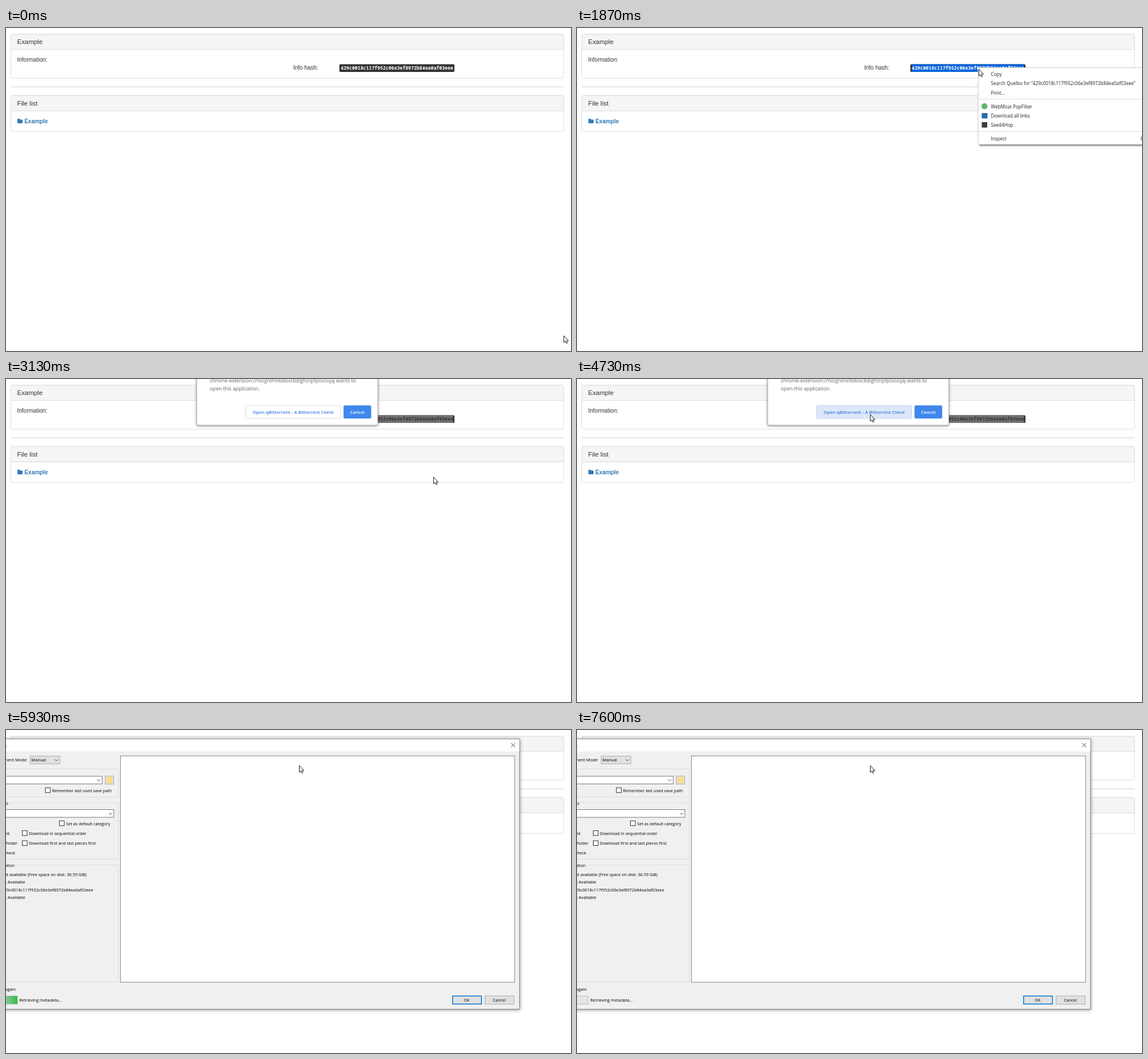
These frames come from a looping animation (989 px wide and 566 px high, 8 s). An HTML page:

```html
<!DOCTYPE html>
<html lang="en">
<head>
<meta charset="utf-8">
<title>Info hash to magnet</title>
<style>
html, body { margin: 0; width: 100%; height: 100%; overflow: hidden; background: #fff; }
svg { display: block; width: 989px; height: 566px; }
text { white-space: pre; }

.page { font: 10px "Liberation Sans", Arial, sans-serif; fill: #333; }
.page .head { font-size: 11.44px; }
.panel { fill: #fff; stroke: #ddd; }
.bar { fill: #f5f5f5; stroke: #ddd; }
.link { fill: #337ab7; font-weight: bold; }
.hash { font: 600 8.21px "Noto Sans Mono", "DejaVu Sans Mono", monospace; }

.menu { font: 8.1px "Open Sans", "Noto Sans", sans-serif; fill: #222; }
.menu .box { fill: #fff; stroke: #c8c8c8; filter: drop-shadow(3px 2px 1px rgba(0, 0, 0, .5)); }
.menu line { stroke: #ddd; }

.prompt { font: 8.72px "Open Sans", "Noto Sans", sans-serif; fill: #5f6368; }
.prompt .box { fill: #fff; stroke: #bbb; filter: drop-shadow(0 1px 2px rgba(0, 0, 0, .5)); }
.prompt .label { font-size: 7.95px; font-weight: 600; text-anchor: middle; }

.dialog { font: 7.3px "Open Sans", "Noto Sans", sans-serif; fill: #000; }
.dialog .box { fill: #f0f0f0; stroke: #777; filter: drop-shadow(0 1px 3px rgba(0, 0, 0, .4)); }
.dialog .group { fill: none; stroke: #dcdcdc; }
.dialog .field { fill: #fff; stroke: #7a7a7a; }
.dialog .button { fill: #e1e1e1; stroke: #adadad; }
.dialog .check { fill: #fff; stroke: #333; }
.dialog .stroke { fill: none; stroke: #444; }
.end { text-anchor: end; }
.mid { text-anchor: middle; }

/* Every part shares one 8 s clock; 0.8333 % is one tick. */
.anim { animation: 8s -4ms step-end infinite; }
.cursor { animation-name: move; }
.arrow { animation-name: arrow; }
.ibeam { animation-name: ibeam; mix-blend-mode: difference; }
.select { animation-name: select; }
.hash.anim { animation-name: hashText; }
.menu { animation-name: menu; }
.hover { animation-name: hover; }
.prompt { animation-name: prompt; }
.open { animation-name: press; }
.dialog { animation-name: dialog; }
.chunk { animation-name: marquee; }

@keyframes move {
  0% { transform: translate(976px, 539px); animation-timing-function: steps(3); }
  2.5% { transform: translate(930px, 470px); animation-timing-function: steps(5); }
  6.6667% { transform: translate(740px, 110px); animation-timing-function: steps(3); }
  9.1667% { transform: translate(702px, 70px); }
  21.6667% { transform: translate(702px, 70px); animation-timing-function: steps(2); }
  23.3333% { transform: translate(703px, 72px); animation-timing-function: steps(3); }
  25.8333% { transform: translate(717px, 97px); animation-timing-function: steps(3); }
  28.3333% { transform: translate(740px, 140px); animation-timing-function: steps(2); }
  30% { transform: translate(746px, 158px); animation-timing-function: steps(2); }
  31.6667% { transform: translate(748px, 171.5px); }
  44.1667% { transform: translate(748px, 171.5px); animation-timing-function: steps(3); }
  46.6667% { transform: translate(435px, 54px); animation-timing-function: steps(2); }
  48.3333%, 100% { transform: translate(513px, 62px); }
}
@keyframes arrow {
  0%, 19.1667%, 100% { opacity: 1; }
  9.1667% { opacity: 0; }
}
@keyframes ibeam {
  0%, 19.1667%, 100% { opacity: 0; }
  9.1667% { opacity: 1; }
}
@keyframes select {
  0% { fill: transparent; }
  13.3333%, 60.8333%, 100% { fill: #0a66dc; }
  39.1667% { fill: #717171; }
}
@keyframes hashText {
  0%, 60.8333%, 100% { fill: #fff; }
  39.1667% { fill: #363636; }
}
@keyframes menu {
  0%, 39.1667%, 100% { opacity: 0; }
  19.1667% { opacity: .6; }
  20% { opacity: 1; }
}
@keyframes hover {
  0% { opacity: 0; transform: translateY(73px); }
  24.1667% { opacity: 1; transform: translateY(73px); }
  25% { opacity: 1; transform: translateY(89px); }
  26.6667% { opacity: 1; transform: translateY(105px); }
  27.5% { opacity: 0; transform: translateY(105px); }
  28.3333% { opacity: 1; transform: translateY(128.5px); }
  29.1667% { opacity: 1; transform: translateY(145px); }
  30.8333%, 100% { opacity: 1; transform: translateY(162px); }
}
@keyframes prompt {
  0%, 60.8333%, 100% { opacity: 0; }
  39.1667% { opacity: 1; }
}
@keyframes press {
  0% { fill: #fff; stroke: #dadce0; }
  59.1667%, 100% { fill: #dce8f8; stroke: #bfd3ef; }
}
@keyframes dialog {
  0% { opacity: 0; }
  65% { opacity: .6; }
  65.8333%, 100% { opacity: 1; }
}
@keyframes marquee {
  0% { transform: translateX(-90px); }
  69.1667% { transform: translateX(-90px); animation-timing-function: steps(10); }
  77.5% { transform: translateX(20px); }
  87.5% { transform: translateX(-88px); animation-timing-function: steps(9); }
  95%, 100% { transform: translateX(20px); }
}
</style>
</head>
<body>
<svg viewBox="0 0 989 566">
  <defs>
    <linearGradient id="glow">
      <stop offset="0" stop-color="#06b025" stop-opacity="0"/>
      <stop offset=".5" stop-color="#06b025" stop-opacity=".82"/>
      <stop offset="1" stop-color="#06b025" stop-opacity="0"/>
    </linearGradient>
    <clipPath id="track"><rect y="466.5" width="19.2" height="13.5"/></clipPath>
    <path id="chevron" d="M-2.8 -1.4L0 1.4L2.8 -1.4"/>
    <rect id="tick" width="8.5" height="8.5"/>
  </defs>

  <g class="page">
    <rect class="panel" x="8.5" y="11" width="967.5" height="77" rx="3"/>
    <path class="bar" d="M8.5 37.7V14q0-3 3-3H973q3 0 3 3V37.7Z"/>
    <text class="head" x="19.5" y="28.3">Example</text>
    <text x="19.5" y="59.3">Information:</text>
    <text x="502.7" y="73.4">Info hash:</text>
    <rect x="583.5" y="63.5" width="201.5" height="13.5" rx="2"/>
    <rect class="select anim" x="586" y="63.5" width="196.5" height="13.5"/>
    <text class="hash anim" x="586" y="73.3">429c0018c117f952c06e3ef8972b84ea0af03eee</text>

    <rect x="8.5" y="102.4" width="967.5" height="1.4" fill="#ddd"/>

    <rect class="panel" x="8.5" y="118.3" width="967.5" height="63" rx="3"/>
    <path class="bar" d="M8.5 145.3V121.3q0-3 3-3H973q3 0 3 3V145.3Z"/>
    <text class="head" x="19.5" y="135.6">File list</text>
    <path fill="#337ab7" d="M20 160q0-1 1-1h2.6q1 0 1 1v.4h3.4q1 0 1 1V166q0 1-1 1H21q-1 0-1-1Z"/>
    <text class="link" x="32.2" y="166.9">Example</text>
  </g>

  <g class="menu anim">
    <rect class="box" x="702" y="69.5" width="300" height="134.5"/>
    <rect class="hover anim" x="702.5" width="290" height="16.4" fill="#c5c5c5"/>
    <line x1="702.5" x2="989" y1="124.8" y2="124.8"/>
    <line x1="702.5" x2="989" y1="181.5" y2="181.5"/>
    <circle cx="713.3" cy="137" r="5.2" fill="#5fb66f"/>
    <rect x="708.5" y="149" width="10" height="9.5" fill="#2a6ca8"/>
    <rect x="708.5" y="165" width="9.5" height="9.5" fill="#3c3c3c"/>
    <text x="724.6" y="84">Copy</text>
    <text x="724.6" y="100.3">Search Quelbo for “429c0018c117f952c06e3ef8972b84ea0af03eee”</text>
    <text x="724.6" y="116.5">Print...</text>
    <text x="724.6" y="140.5">WebMoat PopFilter</text>
    <text x="724.6" y="156.8">Download all links</text>
    <text x="724.6" y="173">Seed4Hop</text>
    <text x="724.6" y="197.2">Inspect</text>
    <text x="986.2" y="197.2">Ctrl+Shift+I</text>
  </g>

  <g class="prompt anim">
    <rect class="box" x="334" y="-20" width="316.8" height="100.8" rx="2"/>
    <text x="356.8" y="6.3">chrome-extension://hiognlmnbdoiicbdigfonpfpoicoijaj wants to</text>
    <text x="356.8" y="20.3">open this application.</text>
    <rect class="open anim" x="419.5" y="46.7" width="166" height="22.3" rx="2.5"/>
    <text class="label" x="502.7" y="60.8" fill="#3b78e0">Open qBittorrent - A Bittorrent Client</text>
    <rect x="590.8" y="46.3" width="48.5" height="23" rx="2.5" fill="#4088ee"/>
    <text class="label" x="615" y="60.8" fill="#fff">Cancel</text>
  </g>

  <g class="dialog anim">
    <rect class="box" x="-20" y="15.8" width="919" height="473.5"/>
    <rect y="16.3" width="898.5" height="21.4" fill="#fff"/>
    <text class="end" x="1.2" y="30">Magnet link</text>
    <path class="stroke" d="M884.3 23L891.3 30M891.3 23L884.3 30"/>

    <text class="end" x="37.5" y="55.4">Torrent Management Mode:</text>
    <rect class="button" x="42.3" y="45.8" width="52" height="13.4"/>
    <text x="44.3" y="55.4">Manual</text>
    <use href="#chevron" class="stroke" x="88.3" y="52.8"/>

    <rect class="group" x="-9" y="68.3" width="205.5" height="49"/>
    <rect class="field" x="-9" y="81" width="177.5" height="13.5"/>
    <use href="#chevron" class="stroke" x="162.5" y="88"/>
    <rect class="button" x="173.8" y="80.7" width="14.6" height="14.2"/>
    <rect x="176.3" y="82.2" width="9.6" height="11.4" fill="#fbdf84"/>
    <use href="#tick" class="check" x="69" y="101.2"/>
    <text x="80.5" y="108.5">Remember last used save path</text>

    <path class="group" d="M6.5 127.4H196.5V226.3H0"/>
    <text class="end" x="4.3" y="130.6">Torrent settings</text>
    <rect class="field" x="-9" y="139.5" width="197.8" height="13.5"/>
    <use href="#chevron" class="stroke" x="183" y="146.8"/>
    <use href="#tick" class="check" x="93.5" y="159.2"/>
    <text x="105.2" y="166.6">Set as default category</text>
    <text class="end" x="6.2" y="183.7">Start torrent</text>
    <use href="#tick" class="check" x="28.5" y="176.4"/>
    <text x="40" y="183.7">Download in sequential order</text>
    <text class="end" x="20" y="201.2">Create subfolder</text>
    <use href="#tick" class="check" x="28.5" y="194"/>
    <text x="40" y="201.2">Download first and last pieces first</text>
    <text class="end" x="16.2" y="217.5">Skip hash check</text>

    <path class="group" d="M17.5 236.6H196.5V441.3H0"/>
    <text class="end" x="15.3" y="239.7">Torrent information</text>
    <text class="end" x="141" y="255.7">Not available (Free space on disk: 36.59 GiB)</text>
    <text class="end" x="33.6" y="269.2">Not Available</text>
    <text class="end" x="152.5" y="282.6">429c0018c117f952c06e3ef8972b84ea0af03eee</text>
    <text class="end" x="33.6" y="296">Not Available</text>

    <rect class="field" x="200.4" y="45.4" width="690" height="396.6" style="stroke:#828790"/>

    <text class="end" x="17" y="456.5">Never show again</text>
    <rect x="-9" y="466.3" width="28.5" height="14" fill="#e6e6e6" stroke="#bcbcbc"/>
    <g clip-path="url(#track)">
      <rect class="chunk anim" y="466" width="90" height="15" fill="url(#glow)"/>
    </g>
    <text x="23.3" y="476.3">Retrieving metadata...</text>
    <rect class="button" x="781.7" y="466.2" width="50.6" height="14" style="stroke:#0078d7;stroke-width:1.5"/>
    <text class="mid" x="806.3" y="476.2">OK</text>
    <rect class="button" x="838.5" y="466" width="51" height="14.3"/>
    <text class="mid" x="863.5" y="476.2">Cancel</text>
  </g>

  <path class="ibeam anim" d="M701.5 64.5h2.2l.8 .8l.8-.8h2.2M704.5 65V79M701.5 79.5h2.2l.8-.8l.8 .8h2.2" fill="none" stroke="#fff"/>
  <g class="cursor anim">
    <path class="arrow anim" d="M.4 .4V12.2L3.1 9.7L4.9 13.6L6.7 12.8L5 9H8.6Z" fill="#fff" stroke="#000" stroke-width=".9"/>
  </g>
</svg>
</body>
</html>
```
